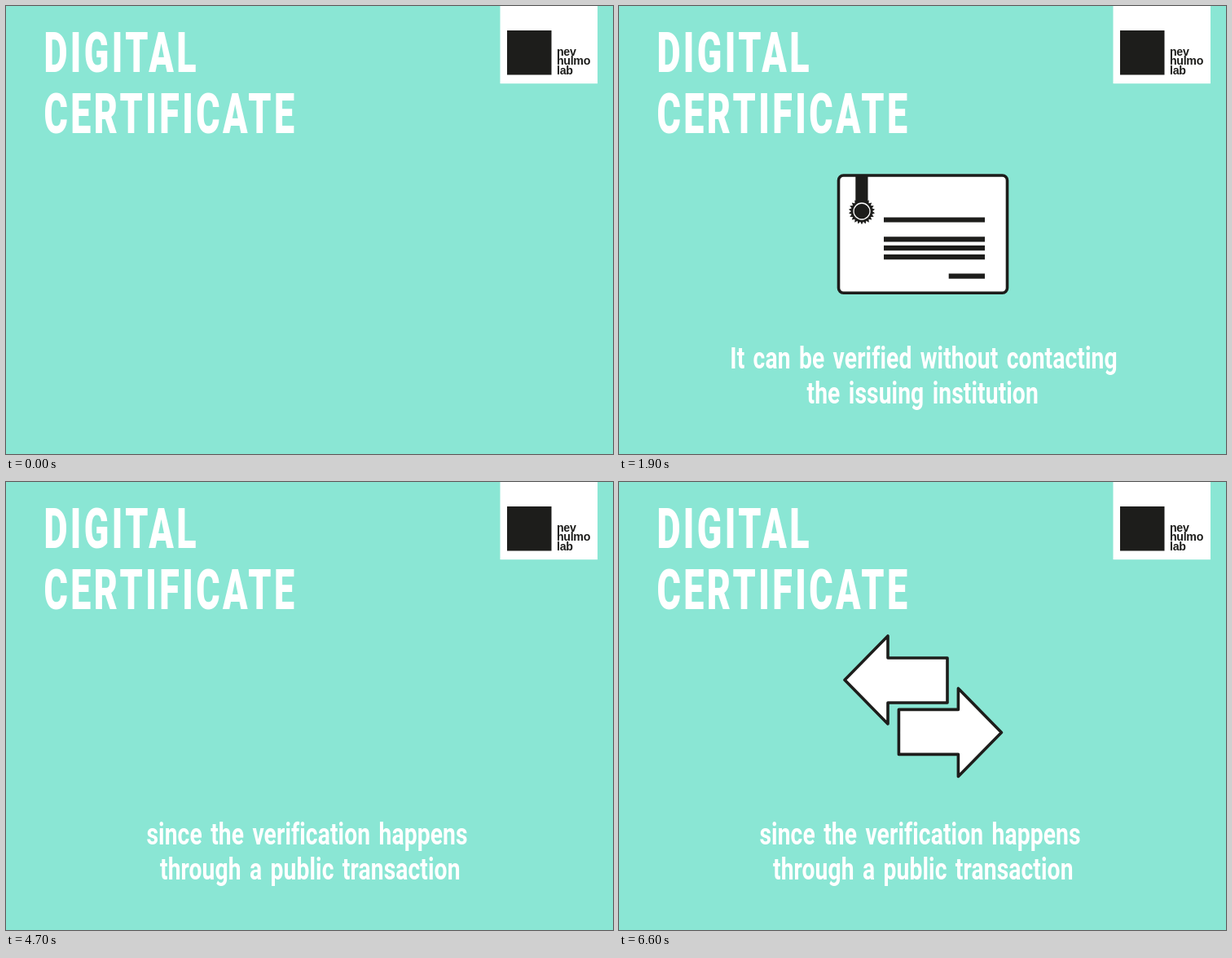
An HTML page for the animation above (7.3 s loop, 745 by 550 pixels).

```html
<!DOCTYPE html>
<html lang="en">
<head>
<meta charset="utf-8">
<title>Digital certificate</title>
<style>
  html, body { margin: 0; width: 100%; height: 100%; overflow: hidden; background: #8ae6d4; }
  svg { display: block; width: 100vw; height: 100vh; }
  .title { font: 900 69px Roboto, "Liberation Sans", sans-serif; letter-spacing: 5.3px; fill: #fff; }
  .caption {
    font: 700 37.3px Roboto, "Liberation Sans", sans-serif;
    letter-spacing: .15px; word-spacing: 4.2px; fill: #fff; text-anchor: middle;
  }
  .label { font: 700 14.2px "Liberation Sans", Arial, sans-serif; letter-spacing: -.3px; }
  .ink { fill: #1d1d1b; }
  .outline { fill: #fff; stroke: #1d1d1b; stroke-width: 3.6; stroke-linejoin: round; }
  .tick { fill: none; stroke: #ff1463; stroke-width: 7; stroke-linecap: round; stroke-linejoin: round; }
</style>
</head>
<body>
<svg viewBox="0 0 745 550">
  <defs>
    <path id="tick" class="tick" d="M183.5 286.5L197.5 309L236.5 257.5"/>
    <path id="arrow" class="outline" d="M277 243L330 189V216H403V271H330V297Z"/>
  </defs>

  <rect width="745" height="550" fill="#8ae6d4"/>
  <g class="title">
    <text transform="translate(46.4 80.5) scale(.65 1)">DIGITAL</text>
    <text transform="translate(46.4 156.3) scale(.65 1)">CERTIFICATE</text>
  </g>

  <rect x="606.5" width="119.5" height="95.2" fill="#fff"/>
  <rect class="ink" x="615" y="30" width="54.5" height="54.5"/>
  <g class="label ink">
    <text x="676" y="61">nev</text>
    <text x="676" y="72.4">hulmo</text>
    <text x="676" y="83.8">lab</text>
  </g>

  <g class="caption" id="first">
    <text transform="translate(374 444.5) scale(.757 1)">It can be verified without contacting</text>
    <text transform="translate(372.7 487.5) scale(.757 1)">the issuing institution</text>
  </g>
  <g class="caption" id="second">
    <text transform="translate(369.5 444.5) scale(.757 1)">since the verification happens</text>
    <text transform="translate(373.3 487.5) scale(.757 1)">through a public transaction</text>
  </g>

  <g id="diploma">
    <rect class="outline" x="269.5" y="208" width="207" height="144.3" rx="6"/>
    <rect class="ink" x="290.3" y="208" width="15.2" height="36"/>
    <path class="ink" id="seal"/>
    <circle cx="298" cy="252" r="10" fill="none" stroke="#fff" stroke-width="1.3"/>
    <path class="ink" d="M325 259.5h124v6h-124zM325 283.2h124v6.2h-124zM325 294h124v6.2h-124zM325 305h124v6.2h-124zM404.7 328.5h44.3v6.2h-44.3z"/>
  </g>
  <g id="ticks">
    <use href="#tick"/>
    <use href="#tick" x="321"/>
  </g>

  <use id="left" href="#arrow"/>
  <use id="right" href="#arrow" transform="rotate(180 373.2 275.2)"/>
</svg>
<script>
  const LOOP = 7300;
  // Visible spans of each part, in ms
  const spans = {
    first: [[700, 4700]],
    diploma: [[1900, 4700]],
    ticks: [[2600, 3300], [4000, 4700]],
    second: [[4700, LOOP]],
    left: [[5900, LOOP]],
    right: [[6600, LOOP]]
  };
  const byId = id => document.getElementById(id);

  function sealPath(cx, cy, teeth, outer, inner) {
    const points = Array.from({ length: teeth * 2 }, (_, i) => {
      const angle = i * Math.PI / teeth - Math.PI / 2;
      const r = i % 2 ? inner : outer;
      return (cx + r * Math.cos(angle)).toFixed(2) + " " + (cy + r * Math.sin(angle)).toFixed(2);
    });
    return "M" + points.join("L") + "Z";
  }

  function draw(ms) {
    const t = ms % LOOP;
    for (const id in spans) {
      const on = spans[id].some(([from, to]) => t >= from && t < to);
      byId(id).style.display = on ? "" : "none";
    }
  }

  byId("seal").setAttribute("d", sealPath(298, 252, 22, 16.2, 13));
  const start = performance.now();
  function tick() {
    draw(performance.now() - start);
    requestAnimationFrame(tick);
  }
  tick();
</script>
</body>
</html>
```
